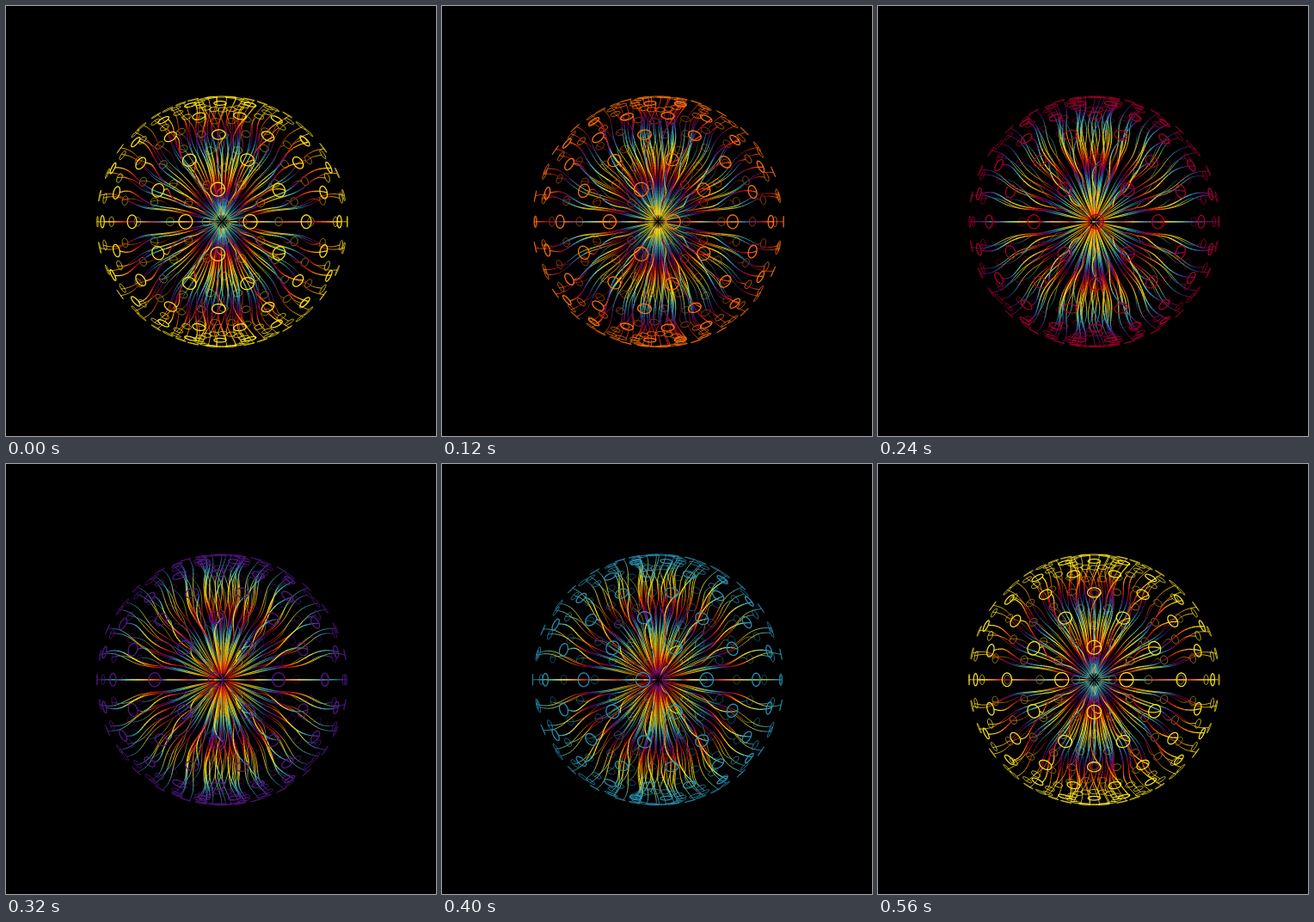
Write an HTML page with a canvas that moves like this. It is 500 px wide and 500 px high and loops after 0.6 s.

```html
<!DOCTYPE html>
<html lang="en">
<head>
<meta charset="utf-8">
<title>Rotating sphere of strands</title>
<style>
html, body { margin: 0; width: 100%; height: 100%; overflow: hidden; background: #000; }
canvas { display: block; width: 500px; height: 500px; }
</style>
</head>
<body>
<canvas id="stage" width="500" height="500"></canvas>
<script>
const ctx = document.getElementById('stage').getContext('2d');
const LOOP = 600, STEP = 40, TAU = Math.PI * 2;
const CX = 251.3, CY = 250.8, R = 140, CAMERA = 500;
const COLS = 16, SPACING = TAU / COLS, RING = 6;
const PARTS = 36, START = 0.06, CYCLES = 2;

// Cyclic palette: position, red, green, blue
const palette = [
  [0, 253, 226, 25], [0.13, 255, 168, 15], [0.27, 255, 62, 0],
  [0.4, 165, 0, 45], [0.53, 88, 20, 132], [0.67, 40, 148, 182],
  [0.8, 122, 212, 160], [0.93, 246, 226, 35], [1, 253, 226, 25]
];
const layers = [
  { near: 0, width: 0.75, alpha: 0.68 },
  { near: 0.93, width: 0.95, alpha: 0.85 },
  { near: 1.16, width: 1.25, alpha: 1 }
];

function color(phase) {
  const u = phase - Math.floor(phase);
  let i = 1;
  while (palette[i][0] < u) i++;
  const a = palette[i - 1], b = palette[i];
  const k = (u - a[0]) / (b[0] - a[0]);
  const c = [1, 2, 3].map(n => Math.round(a[n] + (b[n] - a[n]) * k));
  return `rgb(${c})`;
}

// Point at a distance along a ray, shifted east and north of it
function project(ray, dist, east, north) {
  const { sl, cl, sn, cn } = ray;
  const x = dist * cl * sn + east * cn - north * sl * sn;
  const y = dist * sl + north * cl;
  const z = dist * cl * cn - east * sn - north * sl * cn;
  const p = CAMERA / (CAMERA - z);
  return [CX + x * p, CY - y * p];
}

function makeRays(turn) {
  const rays = [];
  for (let row = -7; row <= 7; row++) {
    const lat = row * SPACING / 2;
    for (let col = 0; col < COLS; col++) {
      const lon = (col + (row % 2 ? 0 : 0.5)) * SPACING - turn;
      const ray = {
        sl: Math.sin(lat), cl: Math.cos(lat),
        sn: Math.sin(lon), cn: Math.cos(lon), side: Math.sign(row)
      };
      const p = CAMERA / (CAMERA - R * ray.cl * ray.cn);
      ray.layer = layers.filter(l => p >= l.near).length - 1;
      rays.push(ray);
    }
  }
  return rays;
}

function strandPoint(ray, s) {
  const amp = RING * Math.pow(s, 2.5);
  const a = TAU * 2 * (1 - s);
  return project(ray, R * s, amp * Math.cos(a), amp * Math.sin(a) * ray.side);
}

function addRing(ray) {
  const n = 28;
  for (let i = 0; i < n; i++) {
    const a = TAU * i / n;
    const pt = project(ray, R, RING * Math.cos(a), RING * Math.sin(a));
    if (i) ctx.lineTo(...pt); else ctx.moveTo(...pt);
  }
  ctx.closePath();
}

function draw(time) {
  const u = time / LOOP;
  const rays = makeRays(SPACING * (u + STEP / LOOP));
  for (const ray of rays) {
    ray.points = [];
    for (let i = 0; i <= PARTS; i++) {
      ray.points.push(strandPoint(ray, START + (1 - START) * i / PARTS));
    }
  }

  ctx.globalAlpha = 1;
  ctx.fillStyle = '#000';
  ctx.fillRect(0, 0, 500, 500);
  ctx.lineJoin = 'round';
  layers.forEach((layer, n) => {
    const group = rays.filter(r => r.layer === n);
    ctx.globalAlpha = layer.alpha;
    for (let i = 0; i < PARTS; i++) {
      const s = START + (1 - START) * (i + 0.5) / PARTS;
      ctx.beginPath();
      for (const ray of group) {
        ctx.moveTo(...ray.points[i]);
        ctx.lineTo(...ray.points[i + 1]);
      }
      ctx.strokeStyle = color(u + CYCLES * (1 - s));
      ctx.lineWidth = layer.width * (0.4 + 0.6 * Math.min(1, s * 2));
      ctx.stroke();
    }
    ctx.beginPath();
    group.forEach(addRing);
    ctx.strokeStyle = color(u);
    ctx.lineWidth = layer.width;
    ctx.stroke();
  });
}

const begin = performance.now();
let last = -1;
function tick() {
  const t = (performance.now() - begin) % LOOP;
  const frame = Math.floor(t / STEP);
  if (frame !== last) draw(frame * STEP);
  last = frame;
  requestAnimationFrame(tick);
}
tick();
</script>
</body>
</html>
```
